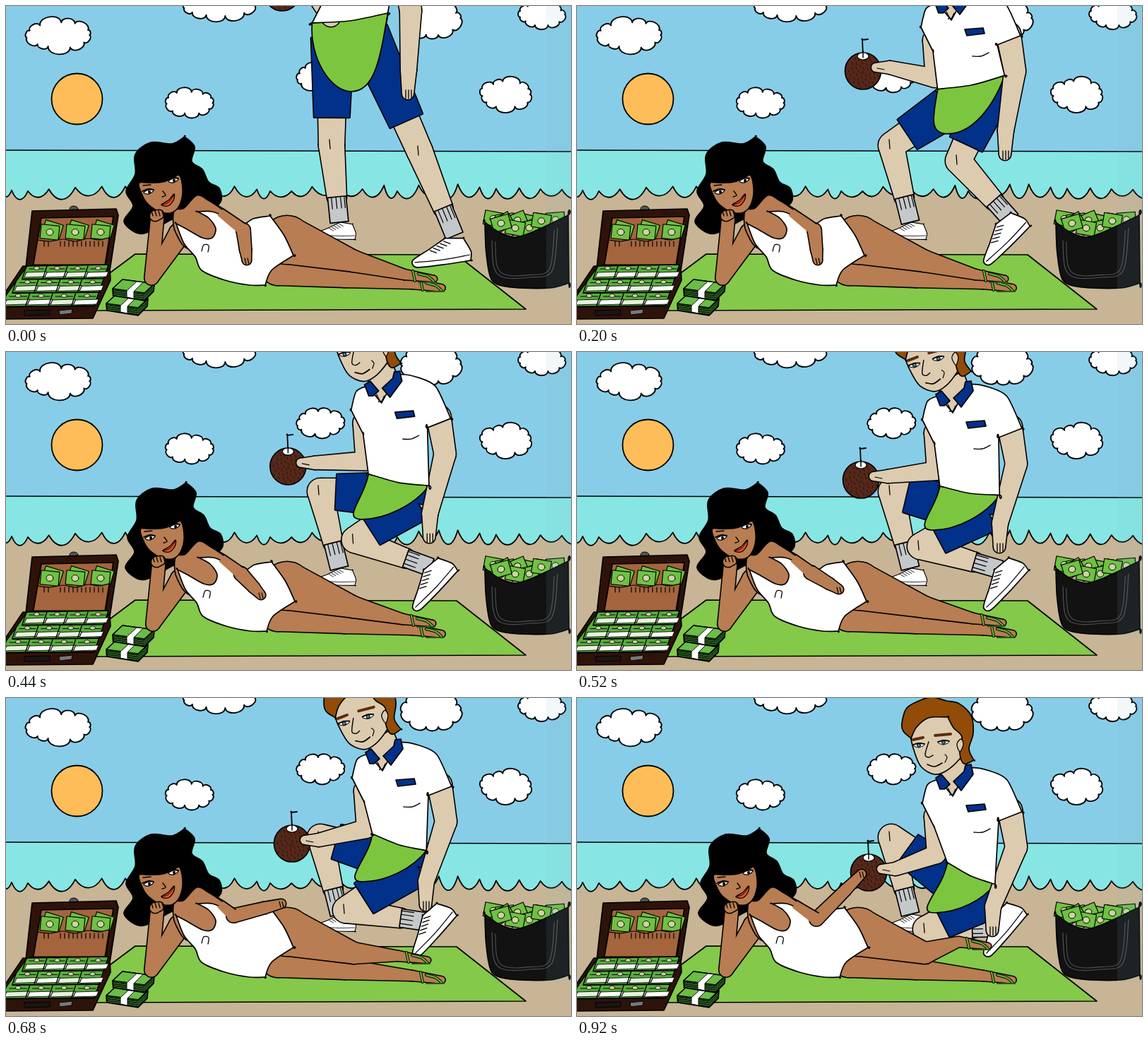
Write an HTML page with a canvas that moves like this. It is 800x450 px and loops after 1.24 s.

```html
<!DOCTYPE html>
<html>
<head>
<meta charset="utf-8">
<style>
html, body { margin: 0; width: 100%; height: 100%; overflow: hidden; background: #88cde8 }
canvas { display: block }
</style>
</head>
<body>
<canvas id="stage" width="800" height="450"></canvas>
<script>
const c = document.getElementById('stage').getContext('2d');
const SKIN = '#ddcbb0', TAN = '#b87d52', GREEN = '#7cc63f', BLUE = '#02318a', BROWN = '#2e130b';
const LOOP = 1240;
// [start ms, place between the seven key poses]
const steps = [[0, 0], [40, .5], [80, 1], [160, 1.5], [200, 2], [280, 2.5], [320, 3], [400, 3.33],
  [440, 3.67], [520, 4], [600, 4.5], [680, 5], [760, 5.33], [840, 5.67], [920, 6]];

const mix = (a, b, f) => a + (b - a) * f;
const clamp = (v, lo = 0, hi = 1) => Math.max(lo, Math.min(hi, v));
const add = (p, x, y) => [p[0] + x, p[1] + y];
const between = (a, b, f) => [mix(a[0], b[0], f), mix(a[1], b[1], f)];
// Points as text; "!" marks a corner.
const points = s => s.replace(/(\S+)!/g, '$1 $1').split(/\s+/).map(p => p.split(',').map(Number));
const track = s => s.split('|').map(r => r.trim().split(' ').map(Number));
function at(keys, u) {
  u = clamp(u, 0, keys.length - 1);
  const i = Math.floor(u), next = keys[i + 1] || keys[i];
  return keys[i].map((v, j) => mix(v, next[j], u - i));
}
function seeded(s) {
  return () => (s = s * 16807 % 2147483647) / 2147483647;
}

function paint(fill, w = 1.7, ink = '#000') {
  if (fill) { c.fillStyle = fill; c.fill(); }
  if (w) { c.lineWidth = w; c.strokeStyle = ink; c.stroke(); }
}
// Smooth curve through points; k = 0 gives straight edges.
function trace(p, k, open) {
  const n = p.length;
  const get = i => open ? p[clamp(i, 0, n - 1)] : p[(i + n) % n];
  c.beginPath();
  c.moveTo(...p[0]);
  for (let i = 0; i < n - (open ? 1 : 0); i++) {
    const a = get(i - 1), b = get(i), d = get(i + 1), e = get(i + 2), q = k / 6;
    c.bezierCurveTo(b[0] + (d[0] - a[0]) * q, b[1] + (d[1] - a[1]) * q,
      d[0] - (e[0] - b[0]) * q, d[1] - (e[1] - b[1]) * q, ...d);
  }
  if (!open) c.closePath();
}
const list = p => typeof p === 'string' ? points(p) : p;
function shape(p, fill, k = 1, w) { trace(list(p), k); paint(fill, w); }
function line(p, w = 1.5, ink) { trace(list(p), 1, true); paint(null, w, ink); }
function oval(x, y, rx, ry, fill, w) {
  c.beginPath();
  c.ellipse(x, y, rx, ry, 0, 0, 7);
  paint(fill, w);
}
function local(x, y, turn, fn) {
  c.save();
  c.translate(x, y);
  c.rotate(turn);
  fn();
  c.restore();
}

// Several forms outlined as one.
function union(paths, fill) {
  c.lineWidth = 3.2;
  c.strokeStyle = '#000';
  c.fillStyle = fill;
  paths.forEach(p => c.stroke(p));
  paths.forEach(p => c.fill(p));
}
function polygon(p) {
  return new Path2D('M' + p.map(q => q.join()).join('L') + 'Z');
}
function tubePoints(a, b, r, R) {
  const d = Math.hypot(b[0] - a[0], b[1] - a[1]) || 1;
  const nx = (a[1] - b[1]) / d, ny = (b[0] - a[0]) / d;
  return [add(a, nx * r, ny * r), add(b, nx * R, ny * R), add(b, -nx * R, -ny * R), add(a, -nx * r, -ny * r)];
}
function limb(joints, radii, fill) {
  const parts = [];
  joints.forEach((p, i) => {
    const ball = new Path2D();
    ball.arc(...p, radii[i], 0, 7);
    parts.push(ball);
    if (i) parts.push(polygon(tubePoints(joints[i - 1], p, radii[i - 1], radii[i])));
  });
  union(parts, fill);
}

function cloud(x, y, rx, ry, seed) {
  const rnd = seeded(seed), n = 11, p = [];
  for (let i = 0; i < n; i++) {
    const a = (i + rnd() * .45) / n * 2 * Math.PI, r = .8 + rnd() * .12;
    p.push([x + rx * r * Math.cos(a), y + ry * r * Math.sin(a)]);
  }
  c.beginPath();
  c.moveTo(...p[0]);
  p.forEach(([ax, ay], i) => {
    const [bx, by] = p[(i + 1) % n], dx = (by - ay) * .45, dy = (ax - bx) * .45;
    c.bezierCurveTo(ax + dx, ay + dy, bx + dx, by + dy, bx, by);
  });
  paint('#fff', 1.9);
}

function shore() {
  const rnd = seeded(77);
  let x = -8, y = 261;
  c.beginPath();
  c.moveTo(x, y);
  while (x < 805) {
    const w = 16 + rnd() * 22, next = 262 - rnd() * 10, dip = 272 + rnd() * 7;
    c.bezierCurveTo(x + w * .3, dip, x + w * .7, dip, x += w, y = next);
  }
  c.lineTo(820, 460);
  c.lineTo(-8, 460);
  paint('#c8b595', 1.8);
}

function scene() {
  c.fillStyle = '#88cde8';
  c.fillRect(0, 0, 800, 450);
  [[75, 41, 52, 21], [260, 137, 38, 18], [300, 0, 60, 16], [602, 17, 46, 28],
    [758, 12, 36, 18], [708, 125, 41, 21], [446, 100, 38, 18]].forEach((p, i) => cloud(...p, 40 + i * 9));
  oval(100.5, 131.5, 36, 36, '#ffbd59', 1.8);
  shape('-5,204 805,206 805,300 -5,300', '#87e6e4', 0);
  shore();
  shape('183,351 638,352 736,429 120,431 120,398', '#84c94a', 0);
}

function bill(x, y, turn) {
  local(x, y, turn, () => {
    shape('-13,-10 13,-10 13,10 -13,10', '#6fc144', 0, 1.2);
    oval(0, 0, 5, 4.5, '#cbd6a0', .9);
  });
}

function suitcase() {
  oval(96, 287, 6, 4, '#555', 1);
  shape('37,290 156,287 159,296 147,374 28,370', BROWN, 0);
  shape('50,300 152,298 141,366 39,366', '#a4653e', 0);
  for (let i = 0; i < 3; i++) {
    bill(66 + i * 36, 316, .3);
    bill(62 + i * 36, 320, .1);
  }
  shape('45,331! 62,333 80,330 98,333 116,329 132,331 146,328! 140,366! 39,366!', '#a4653e', .5, 1.2);
  for (let x = 54; x < 140; x += x % 4 ? 6 : 17) line([[x, 333], [x, 340]], 1.2);
  shape('24,368 147,372 148,388 123,442 -3,443 -3,408', BROWN, 0);
  shape('30,368 145,366 125,424 -12,426', '#58ad3e', 0, 1.3);
  for (let row = 0; row < 3; row++) {
    const y = 368 + row * 19.5, left = 29 - row * 14, w = (116 + row * 7) / 4;
    for (let i = 0; i < 4; i++) local(left + i * w, y, 0, () => {
      shape([[0, 9], [w, 8], [w - 3, 15], [-3, 16]], i % 2 ? '#fff' : '#e6f2dc', 0, .9);
      line([[0, 0], [-6, 18]], 1.4);
      line([[4, 4], [w - 4, 4]], 1);
      oval(w * .5, 3, 4, 2.5, '#cbd6a0', .8);
    });
    line([[left - 6, y + 18.5], [left + w * 4 - 6, y + 17.5]], 1.8);
  }
  shape('26,431 62,430 62,437 26,438', '#1b1512', 0, 1);
  shape('75,431 94,429 93,435 76,437', '#777', 0, 1);
}

function bundle(x, y) {
  local(x, y, 0, () => {
    shape('0,10 14,-3 59,3 58,14 45,27 1,20', '#3f8a31', 0);
    shape('0,10 14,-3 59,3 45,16', '#6abd45', 0, 1.3);
    for (let i = 0; i < 4; i++) shape([[0, 12 + i * 2.5], [45, 18 + i * 2.5], [58, 5 + i * 2.5], [45, 18 + i * 2.5]], null, 0, 1);
    shape('20,13 34,0 43,1 30,14 30,24 20,22', '#fff', 0, 1);
  });
}

function bag() {
  const rnd = seeded(5);
  for (let i = 0; i < 14; i++) bill(690 + i * 37 % 94, 301 + rnd() * 14, rnd() * 1.2 - .6);
  shape('678,306! 698,320 722,327 752,317 796,296! 797,392! 770,399 715,398 688,388 680,350', '#121212', .9);
  for (const s of [1, .9]) local(735, 350, 0, () => {
    c.scale(s, s);
    line('-47,-18 -44,20 -30,34 5,34 38,25 46,-36', 1.2, '#505050');
  });
}

// Man: a few key joints per pose, the rest follows from them
const neckKeys = track('485 -98 | 500 -58 | 532 -12 | 533 12 | 534 54 | 535 71 | 534 107');
const waistKeys = track('487 17 -.13 | 516 84 0 | 558 108 -.2 | 556 150 .27 | 556 196 .15 | 557 204 .3 | 558 248 .43');
const kneeKeys = track('586 206 | 531 222 | 540 219 | 509 247 | 486 275 | 481 300 | 494 327');
const ankleKeys = track('635 325 | 617 303 | 615 303 | 605 298 | 600 308 | 597 317 | 592 325');
const coconutKeys = track('391 -19 | 384 52 | 405 92 | 394 123 | 402 181 | 405 206 | 413 247');

function shoe(x, y, turn, flip) {
  local(x, y, turn, () => {
    c.scale(flip, flip);
    shape('46,-30! 72,-29! 82,-10 81,3! 43,7 4,9 -1,-1 22,-15', '#fff', .8);
    line('80,-5 43,0 2,2', 1.2);
    for (let i = 0; i < 5; i++) line([[24 + i * 5, -14 - i * 3], [33 + i * 5, -10 - i * 3]], 1.3);
  });
}
function leg(hip, knee, ankle) {
  const top = between(knee, ankle, .67), low = between(knee, ankle, .82);
  limb([hip, knee, top], [22, 18, 13.5], SKIN);
  shape(tubePoints(top, ankle, 13, 13), '#c5c8ca', 0);
  for (const o of [.2, .45, .7, .9]) {
    const [a, , , b] = tubePoints(top, low, 13, 13), [, d, e] = tubePoints(top, low, 13, 13);
    line([between(a, b, o), between(d, e, o)], 1.2);
  }
  line([add(knee, -3, -8), add(knee, -2, 5)], 1.3);
}

function head(chin, turn) {
  local(...chin, turn, () => {
    c.translate(-510, -108);
    shape('472,52 478,80 487,98 505,108 522,103 541,86 552,68 545,40 520,22 485,28', SKIN);
    shape('459,36 466,14 488,2 503,-1 522,4 540,8 557,25 560,50 554,72 561,88! 547,93 541,78 544,55 532,42 524,27! 497,28 480,41 472,57! 461,47', '#924c08');
    shape('537,65 543,58 546,66 541,76', SKIN, 1, 1.3);
    line('475,59 489,56', 4, '#5a2c0c');
    line('506,53 528,51', 4, '#5a2c0c');
    for (const [x, y] of [[483, 67], [518, 63]]) {
      shape([[x - 8, y], [x, y - 3], [x + 8, y - 1], [x, y + 3]], '#fff', 1, 1);
      oval(x, y, 2.5, 2.5, '#3c8495', 1);
      line([[x - 8, y - 1], [x, y - 3], [x + 8, y - 2]], 1.8);
    }
    line('497,62 492,80 497,84 503,81', 1.4);
    line('495,94 505,97 516,92', 1.7);
    line('520,80 523,84 520,91', 1.2);
  });
}

function collar(neck) {
  local(...neck, 0, () => {
    shape('-22,8 -19,-8 12,-28 20,-8 -2,32', SKIN, 0);
    shape('-26,6 -18,1 -6,15 -14,22 -20,22', BLUE, 0);
    shape('16,-12 24,-13 27,1 10,24 -1,11 14,-3', BLUE, 0);
    line('-9,20 -3,30 2,22', 1.3);
    oval(-6, 30, 1, 1, '#000', 0);
    shape('17,45 43,43 45,51 20,54', BLUE, 0);
    line('28,83 40,83 51,78', 1.4);
  });
}

function drawCoconut(x, y) {
  local(x, y, 0, () => {
    line('0,-22 -1,-44! 7,-45', 1.8);
    oval(0, 0, 25.5, 26, '#55281a');
    for (let i = 0; i < 46; i++) {
      const r = Math.sqrt(i / 46) * 23, px = r * Math.cos(i * 2.4), py = r * Math.sin(i * 2.4);
      line([[px, py], [px + 1, py + 3]], 1, '#241008');
    }
    oval(0, -21, 8, 5, '#fff', 1.2);
    line('0,-19 0,-28');
  });
}

function apron(l, r, low) {
  const drop = low[1] - l[1];
  c.beginPath();
  c.moveTo(...l);
  c.bezierCurveTo(l[0] - 4, l[1] + drop * .5, low[0] - 30, low[1], ...low);
  c.bezierCurveTo(low[0] + 34, low[1], mix(r[0], low[0], .2), mix(r[1], low[1], .55), ...r);
  c.closePath();
  paint(GREEN);
}

function man(u) {
  const neck = at(neckKeys, u), knee = at(kneeKeys, u), ankle = at(ankleKeys, u), nut = at(coconutKeys, u);
  const [x, y, tilt] = at(waistKeys, u), waist = [x, y];
  const kneel = clamp((u - .7) / 2), stride = clamp(u);
  const along = d => add(waist, d * Math.cos(tilt), d * Math.sin(tilt));
  const half = 54 - 2.8 * u, l = along(-half), r = along(half);
  const hipL = add(along(-25), 0, 25), hipR = add(along(25), 0, 25);
  const kneeL = [461 - 16 * stride, 197];

  shoe(441, 322, .12, .66);
  leg(hipL, kneeL, [472, 306]);
  leg(hipR, knee, ankle);
  shoe(577, 361, -.05 - .6 * stride - .02 * u, 1);

  const trouser = (hip, k) => polygon(tubePoints(hip, between(hip, k, .74), 30, 25));
  union([trouser(hipL, kneeL), trouser(hipR, knee), polygon([l, r, add(hipR, 22, 8), hipL])], BLUE);
  apron(l, r, add(waist, 2 - 54 * kneel, 104 - 48 * kneel));

  const hand = add(neck, 84 - 5 * u, 222);
  limb([add(neck, 79, 52), add(neck, 88, 104), add(hand, 1, -34), hand], [17, 15, 11, 8], SKIN);
  for (const o of [-3, 1, 5]) line([add(hand, o, -5), add(hand, o, 7)], 1.3);
  drawCoconut(...nut);
  const grip = add(nut, 18, -5);
  limb([add(neck, -28, 60), add(neck, -25, 114), add(grip, 20, 0), grip], [14, 13, 9, 6], SKIN);
  line([add(grip, 2, 1), add(grip, 12, 3)], 1.2);

  const sleeve = s => points(s).map(p => add(neck, ...p));
  shape([...sleeve('-23,8 22,-8 50,-4 75,9 96,54! 63,67!'), r, r, add(along(0), 0, 4), l, l,
    ...sleeve('-28,76! -45,42! -38,16')], '#fff', .8);
  collar(neck);
  head(add(neck, -23, 1), -.16 * clamp(6 - u) * clamp(u - 3));
}

// Woman: still until the man kneels, then four key poses
const leanKeys = track('0 | 3 | 0 | 5');
const toeKeys = track('606 386 | 603 383 | 597 371 | 582 351');
const elbowKeys = track('336 317 | 331 312 | 322 308 | 339 313');
const handKeys = track('341 360 | 371 336 | 390 291 | 403 249');

function foot(x, y) {
  for (const [w, ink] of [[4, '#000'], [2.2, '#5fb336']]) {
    line([[x - 30, y - 11], [x - 27, y + 3]], w, ink);
    line([[x - 22, y - 7], [x - 8, y - 3], [x, y + 4]], w, ink);
  }
  line([[x - 22, y + 5], [x + 3, y + 5]], 2, '#25571d');
}

function face() {
  shape('189,250 215,249 243,238 250,257 247,279 236,292 220,292 204,283 194,270', TAN);
  line('188,248 205,249 225,247 245,237', 4);
  for (const [x, y] of [[202, 263], [237, 247]]) {
    shape([[x - 7, y + 1], [x, y - 3], [x + 7, y - 2], [x, y + 3]], '#fff', 1, 1.3);
    oval(x + 1, y, 2, 2.3, '#000', 0);
    line([[x - 9, y - 1], [x, y - 4], [x + 7, y - 3]], 1.8);
    line([[x - 8, y - 9], [x + 3, y - 10]], 1.3);
  }
  line('222,262 226,268 221,270', 1.4);
  shape('220,281 230,275 238,266 237,275 229,283', '#e8512c', 1, 1.3);
  line('220,281 230,278 238,267', 1);
}

function woman(u) {
  const toe = at(toeKeys, u), elbow = at(elbowKeys, u), hand = at(handKeys, u), [lean] = at(leanKeys, u);
  limb([[385, 370], [480, 384], [575, 393], [617, 399]], [25, 14, 7, 4.5], TAN);
  foot(617, 399);
  limb([[398, 331], [492, 361], add(toe, -42, -6), toe], [34, 15, 7, 4], TAN);
  foot(...toe);

  local(lean, 0, 0, () => {
    shape('183,238 183,210 205,193 235,195 253,185! 267,199 263,220 278,231 287,249 302,258 304,277 285,290 240,300 212,315 188,322 167,305 180,283 170,262', '#000');
    limb([[246, 322], [206, 385], [214, 302]], [15, 9.5, 9], TAN);
    shape('238,290 252,286 270,268 285,274 305,287 325,302 330,318 265,345 240,320', TAN);
    shape('241,308! 252,336 268,355 277,374 310,388 345,395 367,395! 376,374 407,353! 394,325 374,297! 350,301 330,313 314,301 292,291 271,291! 287,300 297,315 292,328 278,328 258,317', '#fff', .9);
    line('277,347 280,338 287,339 286,348', 1.3);
    face();
    limb([[211, 297], [217, 295]], [7, 6], TAN);
    for (let x = 206; x < 222; x += 5) line([[x, 290], [x + 2, 297]], 1.3);
  });

  limb([elbow, between(elbow, hand, .65), hand], [9.5, 8, 6], TAN);
  shape(tubePoints([304 + lean, 291], elbow, 7, 8), TAN, 0, 0);
  line([[285 + lean, 274], [306 + lean, 286], add(elbow, 3, -9)], 1.7);
  for (const o of [-3, 1]) line([add(hand, o, -3), add(hand, o + 2, 5)], 1.2);
}

function draw(ms) {
  const t = ms % LOOP, u = steps.filter(s => s[0] <= t).pop()[1];
  c.lineJoin = c.lineCap = 'round';
  scene();
  man(u);
  suitcase();
  bundle(142, 411);
  bundle(151, 390);
  woman(u - 3);
  bag();
  c.fillStyle = 'rgba(130,180,190,.1)';
  c.fillRect(765, 0, 35, 402);
}

const start = performance.now();
function tick() {
  draw(performance.now() - start);
  requestAnimationFrame(tick);
}
tick();
</script>
</body>
</html>
```
